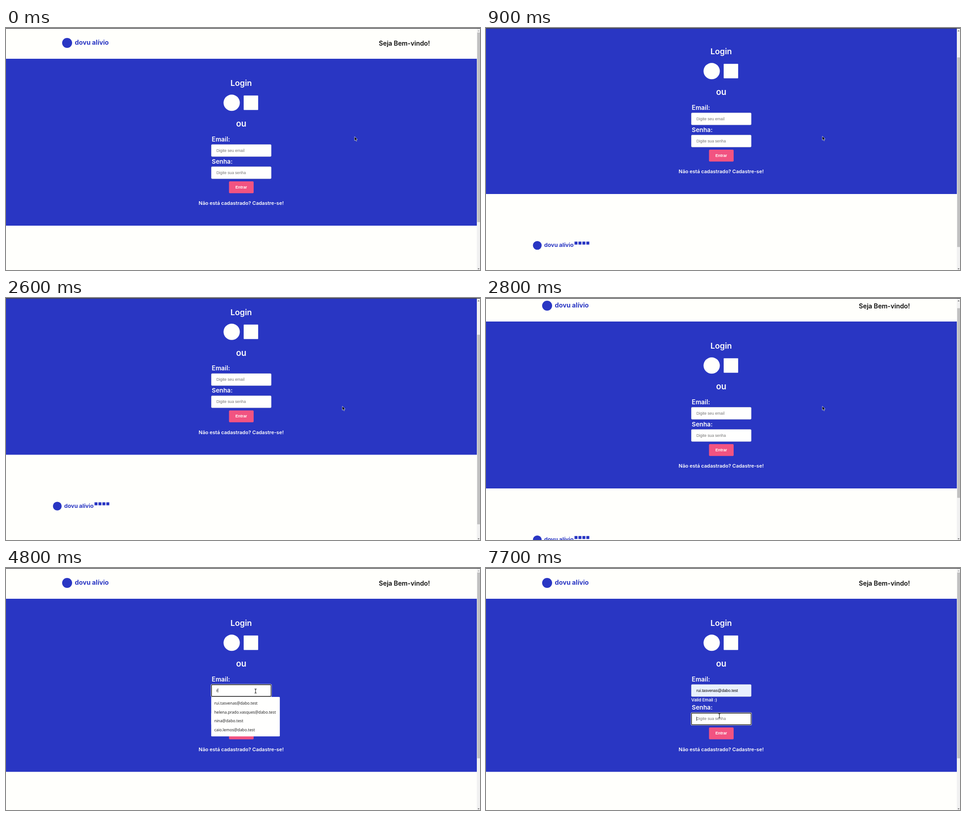
Write an HTML page that moves like this. It is 1047 px wide and 535 px high and loops after 8 s.

```html
<!DOCTYPE html>
<html lang="pt">
<head>
<meta charset="utf-8">
<title>Login</title>
<style>
  html, body { margin: 0; width: 100%; height: 100%; overflow: hidden; background: #fffffc; }
  svg { display: block; width: 1047px; height: 535px; }
  text { font-family: Inter, "Open Sans", sans-serif; font-weight: 600; fill: #fffffc; white-space: pre; }
  .mid { text-anchor: middle; }
  .brand { font-weight: 700; }
  .blue { fill: #2936c3; }
  .dark { fill: #0b0b0b; }
  .field { fill: #fffffe; stroke: #ccc; stroke-width: .5; }
  .entry { font: 400 8.72px "Liberation Sans", Arial, sans-serif; fill: #757575; }
  .button { font: 700 8.72px "Liberation Sans", Arial, sans-serif; }
  .option { font: 500 8.7px "Noto Sans", sans-serif; fill: #222; }
  .ring { fill: none; stroke: #fff; stroke-width: 2.6; }
  .ring + .ring { stroke: #101010; stroke-width: 1.4; }
  .caret { fill: #000; }
</style>
</head>
<body>
<svg viewBox="0 0 1047 535">
  <rect width="1047" height="535" fill="#fffffc"/>
  <g id="page">
    <circle class="blue" cx="135" cy="33" r="11"/>
    <text class="blue brand" x="152" y="37.3" font-size="14.2">dovu alívio</text>
    <text class="dark" x="880" y="39.3" font-size="14.2" text-anchor="middle">Seja Bem-vindo!</text>

    <rect id="panel" class="blue" y="68" width="1040" height="369"/>
    <text class="mid" x="519.5" y="128" font-size="17.7">Login</text>
    <circle cx="498.5" cy="165.3" r="18" fill="#fffffc"/>
    <rect x="525" y="149.3" width="32" height="32" rx="1" fill="#fffffc"/>
    <text class="mid" x="519.5" y="218.3" font-size="18.6">ou</text>
    <text x="454.6" y="250.7" font-size="13.8">Email:</text>
    <rect id="emailBox" class="field" x="453.5" y="257.5" width="132.4" height="26.7" rx="2"/>
    <text id="email" class="entry" x="464.8" y="273.6"></text>

    <text id="valid" x="453.5" y="294.5" font-size="9.2">Valid Email :)</text>
    <g id="lower">
      <text x="454.6" y="299.8" font-size="13.7">Senha:</text>
      <rect class="field" x="453.5" y="306.6" width="132.4" height="26.7" rx="2"/>
      <text class="entry" x="464.8" y="322.8">Digite sua senha</text>
      <rect x="492.6" y="339" width="54.4" height="26.2" rx="2" fill="#f25381"/>
      <text class="button mid" x="519.6" y="354.8">Entrar</text>
      <text class="mid" x="519.5" y="391.4" font-size="11">Não está cadastrado? Cadastre-se!</text>
    </g>

    <g id="focus">
      <rect class="ring" x="453.7" y="257.8" width="132" height="26.2" rx="2"/>
      <rect class="ring" x="453.9" y="258" width="131.6" height="25.8" rx="1.6"/>
    </g>
    <rect id="caret" class="caret" y="266" width=".8" height="9.2"/>

    <circle class="blue" cx="113.3" cy="550.6" r="9.7"/>
    <text class="blue brand" x="128.5" y="554.3" font-size="12.3">dovu alívio</text>
    <g id="social" class="blue"></g>
  </g>

  <g id="list">
    <rect id="listBox" x="453.3" y="285" rx="1.5" fill="#fffffe"/>
    <rect id="active" x="453.3" y="289.4" width="132.6" height="19.6" fill="#c8c8c8"/>
    <g id="options"></g>
  </g>

  <rect x="1040" width="7" height="535" fill="#f1f1f1"/>
  <rect id="thumb" x="1040.8" width="6.2" fill="#c1c1c1"/>
  <path id="up" d="M1041.7 7.2h4.2l-2.1-2.3z"/>
  <path id="down" d="M1041.7 531.5h4.2l-2.1 2.3z"/>
  <rect width="1047" height="1.5" fill="#45454b"/>

  <path id="arrow" d="M0 0V9L2 7.3L3.4 10.4L4.9 9.8L3.5 6.7L6.2 6.5Z" fill="#000" stroke="#fff" stroke-width=".7"/>
  <path id="beam" d="M-2.2-4.6Q-.3-4.6 0-3.8Q.3-4.6 2.2-4.6M0-3.8V3.8M-2.2 4.6Q-.3 4.6 0 3.8Q.3 4.6 2.2 4.6" fill="none" stroke="#2c2c2c" stroke-width="1.2"/>
</svg>
<script>
const $ = id => document.getElementById(id);
const LOOP = 8000, VIEW = 533, TRACK = 519, ROW = 19.6, GROW = 13.6;
const ADDRESS = "rui.tasvenas@dabo.test";
const CONTACTS = [ADDRESS, "helena.prado.vasques@dabo.test", "nina@dabo.test", "caio.lemos@dabo.test"];

// Each row: start time in ms, then the values held until the next row.
const SCROLL = [[0, 0], [800, 22], [900, 70], [1000, 112], [1100, 127],
  [2400, 123], [2500, 111], [2600, 90.5], [2700, 52], [2800, 16], [2900, 0]];
const POINTER = [[0, 770, 240, "arrow"], [100, 761, 238, "arrow"], [200, 748, 237.6, "arrow"],
  [300, 743, 239, "arrow"], [3700, 742.6, 239, "arrow"], [3800, 692, 246, "arrow"],
  [3900, 598, 262, "arrow"], [4000, 551.3, 272, "beam"], [6700, 550, 274, "beam"],
  [6800, 546, 279, "beam"], [6900, 540, 288, "arrow"], [7000, 533, 298, "arrow"],
  [7100, 526, 307, "arrow"], [7200, 520, 315, "arrow"], [7300, 516.5, 324.5, "beam"],
  [7400, 515.5, 326.8, "beam"]];
const EMAIL = [[0, ""], [4800, "r"], [5000, "ru"], [5100, "rui"], [5900, ADDRESS]];
const OPTIONS = [[0, 0], [4200, 4], [4900, 1], [6600, 0]];
const CARET = [[0, ""], [4200, "email"], [5700, ""], [7500, "password"]];

const at = (table, t) => table.findLast(row => row[0] <= t).slice(1);
const set = (id, attrs) => {
  for (const name in attrs) $(id).setAttribute(name, attrs[name]);
};
const show = (id, on) => { $(id).style.display = on ? "" : "none"; };
const add = (parent, tag, attrs, text = "") => {
  const el = document.createElementNS("http://www.w3.org/2000/svg", tag);
  for (const name in attrs) el.setAttribute(name, attrs[name]);
  el.textContent = text;
  $(parent).append(el);
};

for (let i = 0; i < 4; i++) {
  add("social", "rect", { x: 195.5 + i * 8.7, y: 542.2, width: 6.6, height: 6.6 });
  add("options", "text", { class: "option", x: 460, y: 302.2 + i * ROW }, CONTACTS[i]);
}

function drawPage(t) {
  const [scroll] = at(SCROLL, t);
  const grow = t >= 4800 ? GROW : 0;
  const scale = TRACK / (VIEW + 127 + grow);
  set("page", { transform: `translate(0 ${-scroll})` });
  set("panel", { height: 369 + grow });
  set("lower", { transform: `translate(0 ${grow})` });
  set("thumb", { y: 10 + scroll * scale, height: VIEW * scale });
  set("up", { fill: scroll ? "#505050" : "#a3a3a3" });
  set("down", { fill: scroll < 127 ? "#505050" : "#a3a3a3" });
}

function drawForm(t) {
  const [value] = at(EMAIL, t);
  const preview = t >= 5900 && t < 6600;
  const inPassword = t >= 7500;
  $("email").textContent = value || "Digite seu email";
  $("email").style.fill = value ? "#000" : "";
  $("email").style.fontSize = preview ? "7.27px" : "";
  $("emailBox").style.fill = t >= 5900 ? "#e8f0fe" : "";
  show("valid", t >= 6600);
  show("focus", t >= 4200);
  set("focus", { transform: `translate(0 ${inPassword ? 49.1 + GROW : 0})` });

  const [caret] = at(CARET, t);
  show("caret", caret);
  const typed = value && !inPassword ? $("email").getComputedTextLength() : 0;
  set("caret", { x: 464.8 + typed, y: inPassword ? 328.7 : 266 });
}

function drawList(t) {
  const [count] = at(OPTIONS, t);
  show("list", count);
  show("active", t >= 5900);
  set("listBox", { width: count > 1 ? 151.5 : 132.6, height: 8.8 + count * ROW });
  [...$("options").children].forEach((el, i) => { el.style.display = i < count ? "" : "none"; });
}

function drawPointer(t) {
  const [x, y, kind] = at(POINTER, t);
  for (const id of ["arrow", "beam"]) show(id, id === kind);
  set(kind, { transform: `translate(${x} ${y})` });
}

const start = performance.now();
function frame() {
  const t = (performance.now() - start) % LOOP;
  drawPage(t);
  drawForm(t);
  drawList(t);
  drawPointer(t);
  requestAnimationFrame(frame);
}
frame();
</script>
</body>
</html>
```
